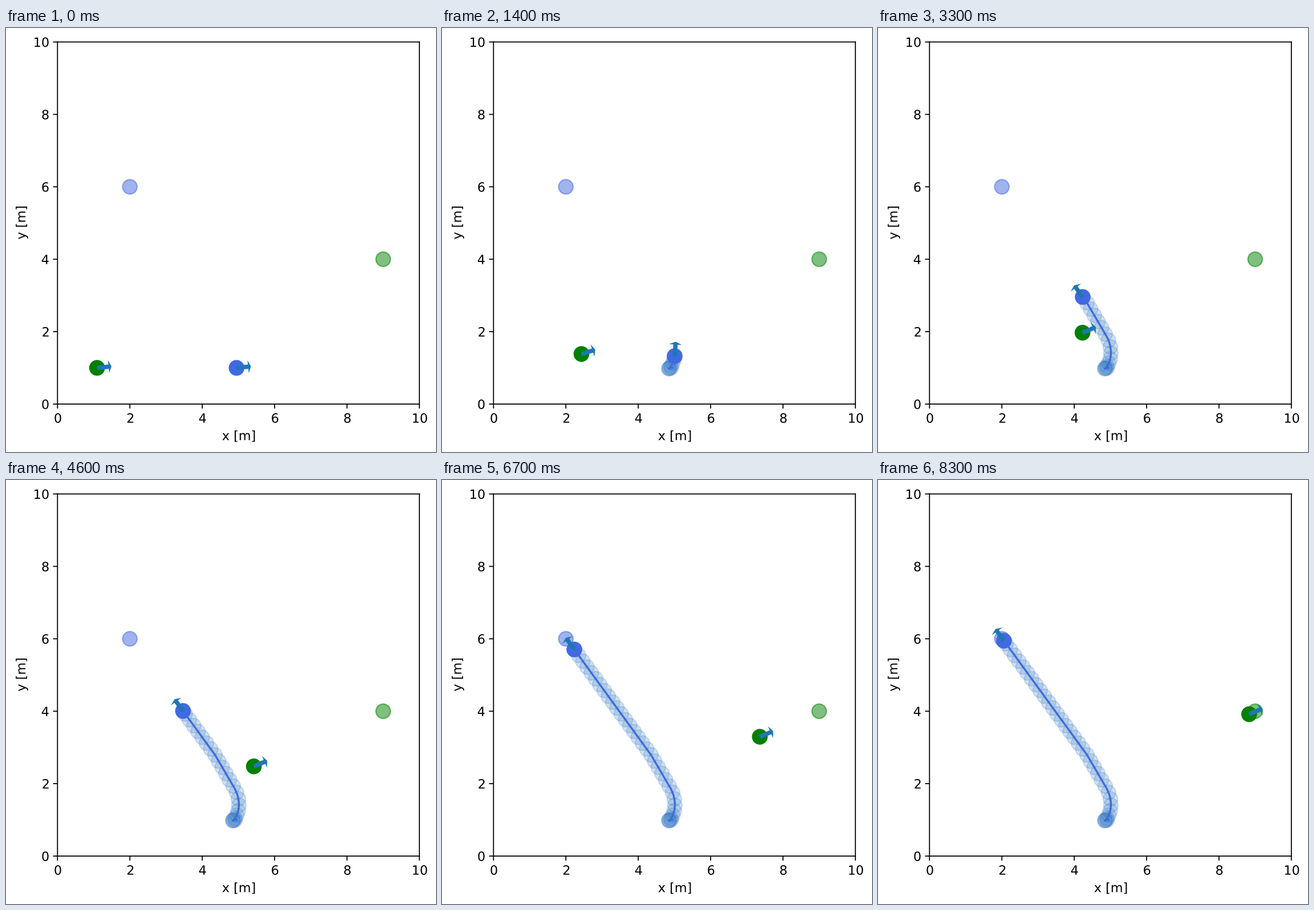
Write a matplotlib script that moves like this. It is 754x743 px and loops after 8.4 s.

```python
import math

import matplotlib.pyplot as plt
import numpy as np
from matplotlib.animation import FuncAnimation
from matplotlib.lines import Line2D
from matplotlib.patches import Circle, PathPatch, Polygon
from matplotlib.textpath import TextPath
from matplotlib.transforms import Affine2D, IdentityTransform

W, H, DPI = 754, 743, 161
FRAMES, INTERVAL = 84, 100
DT = 0.1
RADIUS = 0.2
ARROW_LEN, ARROW_WIDTH = 0.4, 0.6

# Layout in pixels, origin at the bottom left
LEFT, BOTTOM, SIDE = 90.3, 84.0, 634.5
PT = DPI / 72
EM = 10 * PT
ASCENT, DESCENT = 0.76 * EM, 0.208 * EM
TICK, TICK_PAD, LABEL_PAD = 3.5 * PT, 7 * PT, 4 * PT

plt.rcParams["font.family"] = "DejaVu Sans"

# Unit arrow pointing along +x
ARROW = np.array([[0, .1], [0, -.1], [.8, -.1], [.8, -.3],
                  [1, 0], [.8, .3], [.8, .1]]) * [ARROW_LEN, ARROW_WIDTH]


def drive(start, goal):
    """Poses (x, y, heading) of a robot steering to its goal in fixed turns."""
    x, y = start
    heading = 0.0
    poses = []
    for _ in range(FRAMES):
        dx, dy = goal[0] - x, goal[1] - y
        dist = math.hypot(dx, dy)
        if dist > 0.1:
            error = math.atan2(dy, dx) - heading
            speed = math.cos(error)
            x += speed * math.cos(heading) * DT
            y += speed * math.sin(heading) * DT
            if abs(error) > 0.1 and dist > 0.2:
                heading += math.copysign(DT, error)
        poses.append((x, y, heading))
    return np.array(poses)


def arrow_points(pose):
    x, y, heading = pose
    c, s = math.cos(heading), math.sin(heading)
    return ARROW @ np.array([[c, s], [-s, c]]) + [x, y]


# The small surplus keeps the pixel size from rounding down
fig = plt.figure(figsize=((W + 0.01) / DPI, (H + 0.01) / DPI), dpi=DPI,
                 facecolor="white")
ax = fig.add_axes([LEFT / W, BOTTOM / H, SIDE / W, SIDE / H])
ax.set(xlim=(0, 10), ylim=(0, 10), xticks=[], yticks=[])
for spine in ax.spines.values():
    spine.set_snap(False)


def write(text, x, y, align=0.5, angle=0):
    """Outline text on a baseline; align 0.5 centres it, 1 ends it at x."""
    path = TextPath((0, 0), text, size=EM)
    shift = -align * path.get_extents().x1
    place = Affine2D().translate(shift, 0).rotate_deg(angle).translate(x, y)
    fig.add_artist(PathPatch(place.transform_path(path), fc="black", lw=0,
                             transform=IdentityTransform()))
    return -shift


def tick(xs, ys):
    fig.add_artist(Line2D(xs, ys, color="black", lw=0.8, snap=False,
                          solid_capstyle="butt",
                          transform=IdentityTransform()))


def draw_scales():
    widest = 0
    for value in range(0, 11, 2):
        x = LEFT + SIDE * value / 10
        y = BOTTOM + SIDE * value / 10
        tick([x, x], [BOTTOM - TICK, BOTTOM])
        tick([LEFT - TICK, LEFT], [y, y])
        write(str(value), x, BOTTOM - TICK_PAD - ASCENT)
        width = write(str(value), LEFT - TICK_PAD, y - ASCENT / 2, align=1)
        widest = max(widest, width)
    mid = SIDE / 2
    write("x [m]", LEFT + mid,
          BOTTOM - TICK_PAD - LABEL_PAD - 2 * ASCENT - DESCENT)
    write("y [m]", LEFT - TICK_PAD - widest - LABEL_PAD - DESCENT,
          BOTTOM + mid, angle=90)


draw_scales()


class Robot:
    def __init__(self, start, goal, color):
        self.poses = drive(start, goal)
        ax.add_patch(Circle(goal, RADIUS, color=color, alpha=0.5, lw=1))
        self.body = ax.add_patch(
            Circle(start, RADIUS, color=color, lw=1, zorder=3))
        self.arrow = ax.add_patch(
            Polygon(ARROW, closed=True, fc="tab:blue", ec="none", zorder=4))

    def show(self, n):
        self.body.center = tuple(self.poses[n, :2])
        self.arrow.set_xy(arrow_points(self.poses[n]))


blue = Robot((5, 1), (2, 6), "royalblue")
green = Robot((1, 1), (9, 4), "green")

trail, = ax.plot([], [], color="royalblue", lw=1.5, zorder=2)
ghosts = [(k, ax.add_patch(Circle(tuple(blue.poses[k, :2]), RADIUS,
                                  fc="tab:blue", ec="royalblue",
                                  alpha=0.2, lw=1, visible=False)))
          for k in range(1, 71, 2)]


def update(n):
    blue.show(n)
    green.show(n)
    trail.set_data(blue.poses[:n + 1, 0], blue.poses[:n + 1, 1])
    for k, ghost in ghosts:
        ghost.set_visible(k < n)
    return [trail, blue.body, green.body, blue.arrow, green.arrow]


def reset():
    return update(0)


anim = FuncAnimation(fig, update, frames=FRAMES, init_func=reset,
                     interval=INTERVAL, repeat=True, repeat_delay=0)
plt.show()
```
